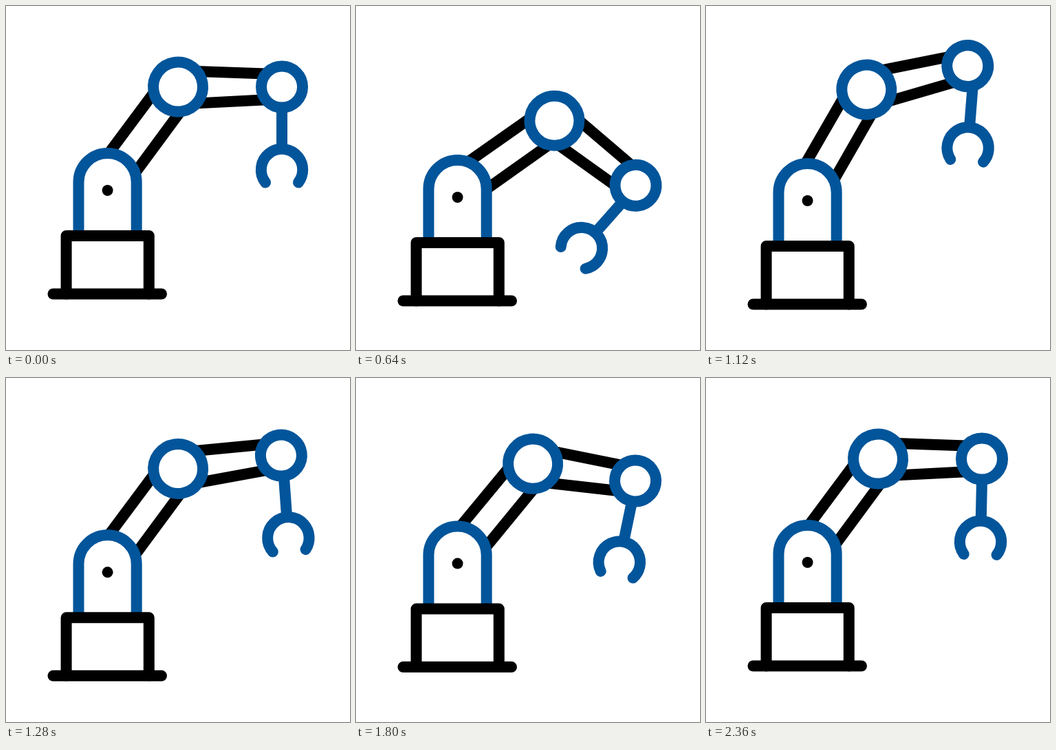
Animation, 500 px wide and 500 px high, one loop 2.4 s. Source, as an HTML page with a canvas:

```html
<!DOCTYPE html>
<html lang="en">
<head>
<meta charset="utf-8">
<title>Robot arm</title>
<style>
  html, body { margin: 0; width: 100%; height: 100%; overflow: hidden; background: #fff; }
  canvas { display: block; width: 500px; height: 500px; }
</style>
</head>
<body>
<canvas id="stage"></canvas>
<script>
const canvas = document.getElementById('stage');
const ctx = canvas.getContext('2d');
const ratio = window.devicePixelRatio || 1;
canvas.width = canvas.height = 500 * ratio;

const BLACK = '#000', BLUE = '#02559a';
const LOOP = 2400, STEP = 40;
const RAD = Math.PI / 180;
const REST_ANGLE = -53.6;
const UPPER = 172.6, FORE = 151;
const FORE_DELAY = 190, GRIP_DELAY = 472;

// Each track is a list of [time, value] with an eased move between neighbours.
const SWING = [[70, 0], [480, 20.6], [565, 20.6], [995, -8.4], [1015, -8.4], [1515, 7.1], [1520, 7.1], [2025, 0]];
const SINK = [[130, 0], [960, 15], [1180, 15], [1955, 0]];

function sample(track, t) {
  const next = track.findIndex(key => key[0] > t);
  if (next === 0) return track[0][1];
  if (next < 0) return track[track.length - 1][1];
  const [t0, v0] = track[next - 1], [t1, v1] = track[next];
  const u = (t - t0) / (t1 - t0);
  return v0 + (v1 - v0) * u * u * (3 - 2 * u);
}

function stroke(color, points, cap = 'butt') {
  ctx.beginPath();
  points.forEach(([x, y]) => ctx.lineTo(x, y));
  ctx.strokeStyle = color;
  ctx.lineCap = cap;
  ctx.stroke();
}

function ring(x, y, r) {
  ctx.beginPath();
  ctx.arc(x, y, r, 0, 2 * Math.PI);
  ctx.fillStyle = '#fff';
  ctx.fill();
  ctx.strokeStyle = BLUE;
  ctx.stroke();
}

function joint(x, y, degrees, paint) {
  ctx.save();
  ctx.translate(x, y);
  ctx.rotate(degrees * RAD);
  paint();
  ctx.restore();
}

function gripper() {
  stroke(BLUE, [[0, 0], [0, 59]]);
  ctx.beginPath();
  ctx.arc(0, 88.5, 30.2, Math.PI - 0.656, 0.656);
  ctx.lineCap = 'round';
  ctx.stroke();
}

function forearm(gripAngle) {
  stroke(BLACK, [[28, -22.5], [128, -19.1]]);
  stroke(BLACK, [[28, 23.8], [128, 18.6]]);
  ring(FORE, 0, 30);
  joint(FORE, 32, gripAngle, gripper);
}

function upperArm(foreAngle, gripAngle) {
  stroke(BLACK, [[30, -23.7], [150, -23.2]]);
  stroke(BLACK, [[30, 24], [150, 24]]);
  joint(UPPER, 0, foreAngle - REST_ANGLE, () => forearm(gripAngle));
  ring(UPPER, 0, 36);
}

function base() {
  ctx.beginPath();
  ctx.moveTo(105.5, 330);
  ctx.arc(147.6, 256, 42.1, Math.PI, 0);
  ctx.lineTo(189.7, 330);
  ctx.fillStyle = '#fff';
  ctx.fill();
  ctx.strokeStyle = BLUE;
  ctx.lineCap = 'butt';
  ctx.stroke();

  ctx.beginPath();
  ctx.arc(147.6, 268, 8, 0, 2 * Math.PI);
  ctx.fillStyle = BLACK;
  ctx.fill();

  stroke(BLACK, [[87.6, 418.5], [87.6, 334], [207.8, 334], [207.8, 418.5]], 'round');
  stroke(BLACK, [[68.5, 418.5], [226, 418.5]], 'round');
}

function draw(t) {
  ctx.setTransform(ratio, 0, 0, ratio, 0, 0);
  ctx.fillStyle = '#fff';
  ctx.fillRect(0, 0, 500, 500);
  ctx.lineWidth = 16;
  ctx.lineJoin = 'round';
  ctx.translate(0, sample(SINK, t));
  const foreAngle = sample(SWING, t - FORE_DELAY);
  const gripAngle = sample(SWING, t - GRIP_DELAY);
  joint(147.6, 256.5, REST_ANGLE + sample(SWING, t), () => upperArm(foreAngle, gripAngle));
  base();
}

const start = performance.now();
function tick() {
  const t = (performance.now() - start) % LOOP;
  draw(Math.floor(t / STEP) * STEP);
  requestAnimationFrame(tick);
}
tick();
</script>
</body>
</html>
```
